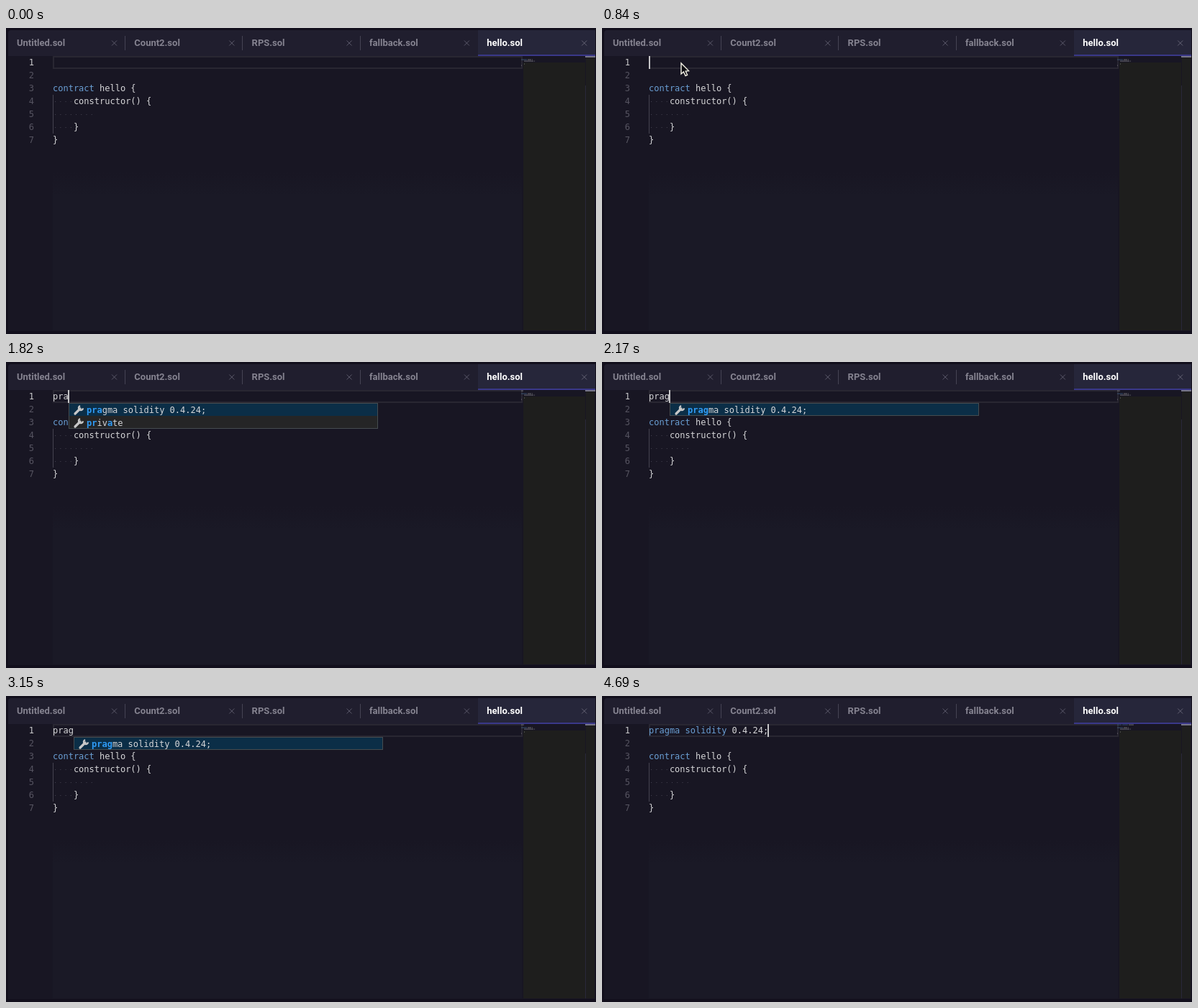
These frames come from a looping animation (820x426 px, 4.76 s). An HTML page with a canvas:

```html
<!DOCTYPE html>
<html lang="en">
<head>
<meta charset="utf-8">
<title>Editor autocomplete</title>
<style>
  html, body { margin: 0; width: 100%; height: 100%; overflow: hidden; background: #120f1c; }
  canvas { display: block; }
</style>
</head>
<body>
<canvas id="stage" width="820" height="426"></canvas>
<script>
const ctx = document.getElementById('stage').getContext('2d');
const LOOP = 4760, STEP = 70;
const CH = 7.224, LEFT = 65, TOP = 39, ROW = 18;
const MONO = '12px "DejaVu Sans Mono", monospace';
const BLUE = '#6a9fd4', TEXT = '#d6d6d8', MATCH = '#2f9bf5';
const PRAGMA = 'pragma solidity 0.4.24;';
const TABS = ['Untitled.sol', 'Count2.sol', 'RPS.sol', 'fallback.sol', 'hello.sol'];
const BODY = ['', 'contract hello {', '    constructor() {', '        ', '    }', '}'];

// [time, text of line 1]
const TYPING = [[0, ''], [1330, 'p'], [1540, 'pr'], [1750, 'pra'], [2170, 'prag'], [3430, PRAGMA]];
// [from, to] while the text caret shows
const CARET = [[630, 1120], [1330, 2660], [3220, 3920], [4410, LOOP]];
// [time, x, y]
const ARROW = [[70, 500, 426], [280, 390, 300], [490, 150, 85], [630, 110, 49], [1330, 110, 49]];
const BEAM = [[3710, 112, 54], [3920, 494, 301], [4200, 498, 363], [4480, 500, 440]];

function rect(x, y, w, h, color) {
  ctx.fillStyle = color;
  ctx.fillRect(x, y, w, h);
}

function line(points, color, width = 1) {
  ctx.beginPath();
  points.forEach(([x, y]) => ctx.lineTo(x, y));
  ctx.strokeStyle = color;
  ctx.lineWidth = width;
  ctx.stroke();
}

function text(str, x, y, color, font = MONO, align = 'left') {
  ctx.font = font;
  ctx.textAlign = align;
  ctx.fillStyle = color;
  ctx.fillText(str, x, y);
}

const rowBase = i => TOP + ROW * i + 13;

function along(path, t) {
  const last = path.length - 1;
  if (t < path[0][0] || t >= path[last][0]) return null;
  const i = path.findIndex(p => p[0] > t);
  const [t0, x0, y0] = path[i - 1], [t1, x1, y1] = path[i];
  const k = (t - t0) / (t1 - t0);
  return [x0 + (x1 - x0) * k, y0 + (y1 - y0) * k];
}

function drawFrame() {
  rect(0, 0, 820, 426, '#120f1c');
  rect(3, 39, 816, 383, '#181623');
  const shade = ctx.createLinearGradient(0, 200, 0, 235);
  shade.addColorStop(0, '#1a192600');
  shade.addColorStop(1, '#1a1926');
  ctx.fillStyle = shade;
  ctx.fillRect(65, 200, 652, 221);
  rect(719, 48, 86, 373, '#1e1e1d');
  rect(806, 41, 12, 380, '#1e1e1e');
  rect(805, 80, 1, 341, '#29283a');
}

function drawTabs() {
  ctx.fillStyle = '#201e2e';
  ctx.beginPath();
  ctx.roundRect(3, 3, 816, 36, [4, 4, 0, 0]);
  ctx.fill();
  rect(656, 3, 163, 34, '#26263a');
  rect(656, 37, 163, 2, '#3a3889');
  TABS.forEach((name, i) => {
    const x = 15 + i * 163.3, active = i === 4;
    text(name, x, 25, active ? '#ffffff' : '#858390', '600 13px Roboto, sans-serif');
    const cx = x + 135.5, r = 3.5;
    const color = active ? '#646274' : '#5b596a';
    line([[cx - r, 21 - r], [cx + r, 21 + r]], color);
    line([[cx + r, 21 - r], [cx - r, 21 + r]], color);
    if (i < 3) rect(Math.round(x + 150), 11, 1, 20, '#454354');
  });
}

function drawMinimap(lines) {
  lines.forEach((str, row) => {
    const word = /^(pragma solidity|contract)/.exec(str);
    [...str].forEach((c, i) => {
      if (c === ' ') return;
      const blue = word && i < word[0].length;
      rect(716 + i, 39.5 + row * 2, 1, 1.2, blue ? '#496d9390' : '#a5a5a880');
    });
  });
  rect(805, 39, 14, 2, '#77768a');
}

function drawCode(first) {
  ctx.strokeStyle = '#292732';
  ctx.lineWidth = 2;
  ctx.strokeRect(66, 40, 651, 16);
  const lines = [first, ...BODY];
  lines.forEach((str, i) => {
    const y = rowBase(i);
    text(String(i + 1), 39, y, i ? '#565461' : '#c8c8ca', MONO, 'right');
    const word = (/^(pragma solidity|contract)/.exec(str) || [''])[0];
    text(str.slice(word.length), LEFT + word.length * CH, y, TEXT);
    text(word, LEFT, y, BLUE);
    const indent = /^ */.exec(str)[0].length;
    for (let n = 0; n < indent; n++) rect(LEFT + (n + .5) * CH - .5, y - 4, 1, 1, '#464453');
  });
  rect(65, 93, 1, 54, '#454351');
  drawMinimap(lines);
}

function drawWrench(x, y) {
  ctx.save();
  ctx.translate(x, y);
  ctx.lineCap = 'round';
  line([[2, 12], [9, 5]], '#c8c8c8', 3.2);
  ctx.lineCap = 'butt';
  ctx.beginPath();
  ctx.arc(10, 4, 3, .1, Math.PI * 1.4);
  ctx.lineWidth = 2.4;
  ctx.stroke();
  ctx.restore();
}

function drawWordIcon(x, y) {
  ctx.strokeStyle = '#c8c8c8';
  ctx.lineWidth = 1;
  ctx.strokeRect(x + .5, y + .5, 13, 11);
  text('abc', x + 7, y + 8.5, '#d0d0d0', '7px "DejaVu Sans", sans-serif', 'center');
}

// Marks the letters of the typed text, in order, inside the label.
function drawLabel(label, typed, x, y) {
  let hit = 0;
  [...label].forEach((c, i) => {
    const on = c === typed[hit];
    if (on) hit++;
    text(c, x + i * CH, y, on ? MATCH : TEXT, on ? 'bold ' + MONO : MONO);
  });
}

function drawPopup(typed) {
  if (!typed || typed === PRAGMA) return;
  const items = typed === 'p' ? ['p'] : typed === 'prag' ? [PRAGMA] : [PRAGMA, 'private'];
  const x = Math.round(LEFT + typed.length * CH), y = 57;
  const h = items.length * ROW;
  rect(x, y, 430, h, '#252526');
  rect(x, y, 430, ROW, '#0b2e47');
  ctx.strokeStyle = '#454c50';
  ctx.lineWidth = 1;
  ctx.strokeRect(x + .5, y + .5, 429, h - 1);
  items.forEach((label, i) => {
    const top = y + i * ROW;
    if (typed === 'p') drawWordIcon(x + 7, top + 4);
    else drawWrench(x + 7, top + 3);
    drawLabel(label, typed, x + 25, top + 14);
  });
}

function drawArrow([x, y]) {
  ctx.save();
  ctx.translate(x, y);
  ctx.beginPath();
  [[0, 0], [0, 15], [3.4, 12], [6, 17.5], [8.6, 16.3], [6.2, 11], [10.5, 10.6]]
    .forEach(p => ctx.lineTo(...p));
  ctx.closePath();
  ctx.fillStyle = '#0b0a10';
  ctx.fill();
  ctx.strokeStyle = '#f3f1e4';
  ctx.lineWidth = 1.4;
  ctx.stroke();
  ctx.restore();
}

function drawBeam([x, y]) {
  ctx.save();
  ctx.translate(x, y);
  for (const [color, width] of [['#08070d', 3.6], ['#f0f0f0', 1.6]]) {
    line([[-3.5, -7], [-1, -6.5], [0, -5], [0, 5], [-1, 6.5], [-3.5, 7]], color, width);
    line([[3.5, -7], [1, -6.5], [0, -5], [0, 5], [1, 6.5], [3.5, 7]], color, width);
    line([[-2, 1.5], [2, 1.5]], color, width);
  }
  ctx.restore();
}

function draw(t) {
  const typed = TYPING.filter(s => s[0] <= t).pop()[1];
  drawFrame();
  drawTabs();
  drawCode(typed);
  if (CARET.some(([a, b]) => t >= a && t < b)) {
    rect(Math.round(LEFT + typed.length * CH) - (typed ? 1 : 0), 39, 2, 18, '#c4c4c6');
  }
  drawPopup(typed);
  const arrow = along(ARROW, t), beam = along(BEAM, t);
  if (arrow) drawArrow(arrow);
  if (beam) drawBeam(beam);
}

const start = performance.now();
function tick() {
  const t = (performance.now() - start) % LOOP;
  draw(Math.floor(t / STEP) * STEP);
  requestAnimationFrame(tick);
}
tick();
</script>
</body>
</html>
```
